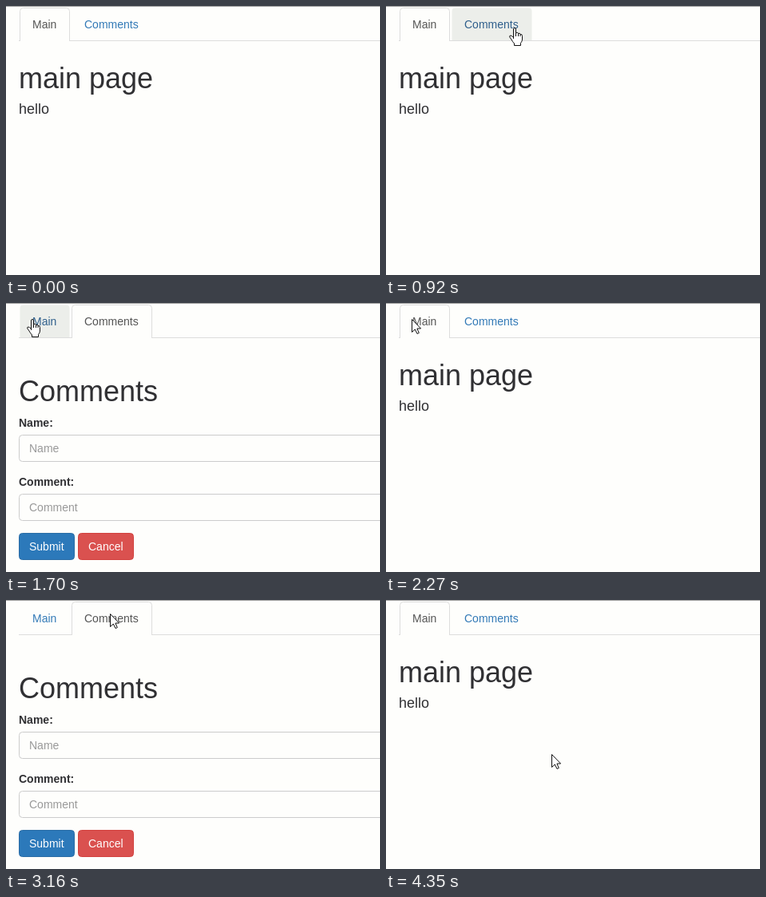
These frames come from a looping animation (468 px wide and 337 px high, 4.48 s). An HTML page:

```html
<!DOCTYPE html>
<html lang="en">
<head>
<meta charset="utf-8">
<title>Tabs</title>
<style>
html, body { margin: 0; width: 100%; height: 100%; overflow: hidden; background: #fefefc; }
svg { display: block; font: 14px "Liberation Sans", Arial, sans-serif; fill: #303033; }
.big { font-size: 36px; }
.mid { font-size: 18px; }
.bold { font-weight: bold; }
.hint { fill: #999; }
.field { fill: #fefefc; stroke: #ccc; }
.button { fill: #fff; }
.tab path { fill: none; }
.tab text { fill: #337ab7; }
.tab.hover path { fill: #eceeea; }
.tab.hover text { fill: #2f5f8c; }
.tab.active path { fill: #fefefc; stroke: #ddd; }
.tab.active text { fill: #555; }
.cursor { fill: #fff; stroke: #111; stroke-linejoin: round; }
</style>
</head>
<body>
<svg width="468" height="337" viewBox="0 0 468 337">
  <rect width="468" height="337" fill="#fefefc"/>
  <rect width="468" height="1" fill="#a2a2a2"/>

  <g class="tab"><path d="M17.5 43V6.5q0-4 4-4h54q4 0 4 4V43"/><text x="33" y="28">Main</text></g>
  <g class="tab"><path d="M82.5 43V6.5q0-4 4-4h92q4 0 4 4V43"/><text x="98" y="28">Comments</text></g>
  <path id="line" stroke="#ddd"/>

  <g class="page">
    <text class="big" x="16" y="103">main page</text>
    <text class="mid" x="16" y="135">hello</text>
  </g>
  <g class="page">
    <text class="big" x="16" y="123">Comments</text>
    <text class="bold" x="16" y="155">Name:</text>
    <rect class="field" x="16.5" y="165.5" width="500" height="33" rx="4"/>
    <text class="hint" x="29" y="187">Name</text>
    <text class="bold" x="16" y="229">Comment:</text>
    <rect class="field" x="16.5" y="239.5" width="500" height="33" rx="4"/>
    <text class="hint" x="29" y="261">Comment</text>
    <rect x="16.5" y="288.5" width="69" height="33" rx="4" fill="#2c79ba" stroke="#2b6da6"/>
    <text class="button" x="29" y="310">Submit</text>
    <rect x="90.5" y="288.5" width="69" height="33" rx="4" fill="#da514f" stroke="#d2423f"/>
    <text class="button" x="103" y="310">Cancel</text>
  </g>

  <g id="mouse" class="cursor">
    <path id="arrow" d="M.5.5V16.5L4.3 13L7 18.5L9.3 17.5L6.9 12H11.6Z"/>
    <path id="hand" transform="translate(-6)" d="M5.5 14V2Q5.5.5 7 .5T8.5 2V6.5Q11.5 5.5 11.5 7.5Q14 6.5 14 8.5Q16.5 8 16.5 10.5V15Q16.5 17 14.5 19.5V22.5H6.5V20Q4.5 18 3 15L.8 12Q.2 10 2 10Q3.5 10 5.5 12.5M8.5 6.5V11M11.5 7.5V11M14 8.5V11"/>
  </g>
</svg>
<script>
const LOOP = 4480;
const $ = id => document.getElementById(id);
const tabs = document.querySelectorAll('.tab');
const pages = document.querySelectorAll('.page');
const spans = [[17, 80], [82, 183]];

// Each move opens a page, then carries the pointer in discrete steps.
const moves = [
  { start: 420, end: 920, steps: 5, from: [207, 115], to: [160, 27], page: 0 },
  { start: 1200, end: 1700, steps: 5, from: [160, 27], to: [32, 20], page: 1 },
  { start: 2270, end: 2530, steps: 3, from: [32, 20], to: [130, 17], page: 0 },
  { start: 3160, end: 3650, steps: 5, from: [130, 17], to: [54, 25], page: 1 },
  { start: 4130, end: 4350, steps: 3, from: [54, 25], to: [207, 193], page: 0 }
];

function pointerAt(move, t) {
  const n = move.steps - 1;
  const p = Math.min(1, (t - move.start) / (move.end - move.start));
  const k = Math.floor(p * n) / n;
  const ease = k * k * (3 - 2 * k);
  return move.from.map((a, i) => Math.round(a + (move.to[i] - a) * ease));
}

function show(el, on) {
  el.style.display = on ? '' : 'none';
}

function draw(t) {
  const move = moves.filter(m => m.start <= t).pop();
  const active = move ? move.page : 0;
  const [x, y] = move ? pointerAt(move, t) : [-99, -99];
  const over = spans.findIndex(([a, b]) => x >= a && x < b && y >= 2 && y < 44);
  const link = over >= 0 && over !== active;

  tabs.forEach((tab, i) => {
    tab.classList.toggle('active', i === active);
    tab.classList.toggle('hover', link && i === over);
  });
  pages.forEach((page, i) => show(page, i === active));
  const [a, b] = spans[active];
  $('line').setAttribute('d', `M16 43.5H${a + 1}M${b - 1} 43.5H468`);
  show($('mouse'), move);
  show($('hand'), link);
  show($('arrow'), !link);
  $('mouse').setAttribute('transform', `translate(${x} ${y})`);
}

const begin = performance.now();
function tick() {
  draw((performance.now() - begin) % LOOP);
  requestAnimationFrame(tick);
}
tick();
</script>
</body>
</html>
```
